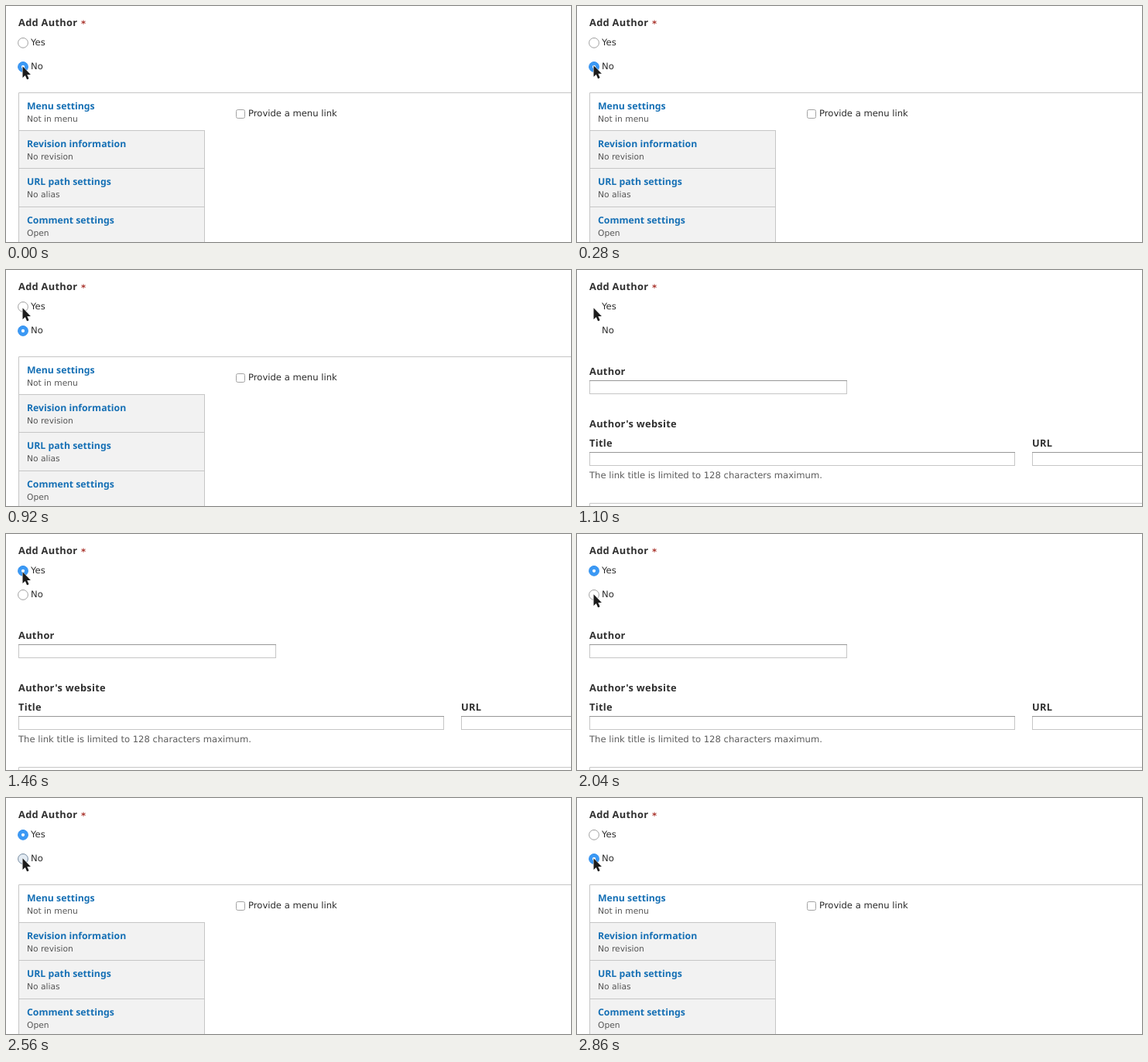
Recreate the animation shown at these times as an HTML page. Size 730x306 px, loop 2.88 s.

```html
<!DOCTYPE html>
<html lang="en">
<head>
<meta charset="utf-8">
<title>Add Author form</title>
<style>
  html, body { margin: 0; width: 100%; height: 100%; overflow: hidden; background: #fff; }
  svg { display: block; width: 730px; height: 306px; }
  text { font: 11.6px "DejaVu Sans", sans-serif; fill: #2b2b2b; text-rendering: geometricPrecision; }
  .label, .tab { font-family: "Noto Sans", sans-serif; font-weight: 700; }
  .label { font-size: 12.8px; letter-spacing: .3px; fill: #303030; }
  .tab { font-size: 12.25px; fill: #1670b5; }
  .note { font-size: 10.7px; fill: #555; }
  .hint { fill: #5c5c5c; }
  .star { font-weight: 700; fill: #a8322a; }
  .line { fill: none; stroke: #c6c6c6; }
  .top { stroke: #979797; }
  .ring { fill: #fff; stroke: #a0a0a0; }
  .dot { fill: none; }
  .on .ring { fill: #3b99f5; stroke: #3290ee; }
  .on .dot { fill: #fff; }
  .down .ring { fill: #e3ebf3; stroke: #74899e; }
</style>
</head>
<body>
<svg viewBox="0 0 730 306">
  <text class="label" x="16" y="26">Add Author</text>
  <text class="star" x="97" y="27">*</text>
  <g id="yes"><circle class="ring" cx="22" cy="47.8" r="6.4"/><circle class="dot" cx="22" cy="47.8" r="2.1"/></g>
  <g id="no"><circle class="ring" cx="22" cy="78.9" r="6.4"/><circle class="dot" cx="22" cy="78.9" r="2.1"/></g>
  <text x="32" y="51">Yes</text>
  <text x="32" y="82">No</text>

  <g id="menu">
    <path class="line" d="M730 112.5H16.5V306"/>
    <g id="tabs"></g>
    <rect x="297.5" y="134.5" width="11" height="11" rx="2" fill="#fff" stroke="#a3a3a3"/>
    <text x="313" y="143">Provide a menu link</text>
  </g>

  <g id="fields">
    <text class="label" x="16" y="136">Author</text>
    <text class="label" x="16" y="204">Author's website</text>
    <text class="label" x="16" y="229">Title</text>
    <text class="label" x="588" y="229">URL</text>
    <text class="hint" x="16" y="270">The link title is limited to 128 characters maximum.</text>
    <path class="line" d="M730 302.5H16.5V306"/>
  </g>

  <path id="cursor" d="M0 0V14.6L3.3 11.6L5.6 17L8.1 15.9L5.8 10.6H10.4Z" fill="#1c1c1c" stroke="#fff" stroke-width="1" stroke-linejoin="round" paint-order="stroke"/>
</svg>
<script>
const LOOP = 2880;
const $ = id => document.getElementById(id);
const add = (id, markup) => $(id).insertAdjacentHTML('beforeend', markup);

const tabs = [
  ['Menu settings', 'Not in menu', 112],
  ['Revision information', 'No revision', 161],
  ['URL path settings', 'No alias', 210],
  ['Comment settings', 'Open', 260]
];
tabs.forEach(([title, note, y], i) => {
  if (i) add('tabs', `<rect x="16.5" y="${y + .5}" width="240" height="52" fill="#f2f2f2" stroke="#c6c6c6"/>`);
  add('tabs', `<text class="tab" x="27" y="${y + 22}">${title}</text>
    <text class="note" x="27" y="${y + 38}">${note}</text>`);
});

for (const [x, y, w] of [[16, 143, 333], [16, 236, 550], [588, 236, 160]]) {
  add('fields', `<rect class="line" x="${x + .5}" y="${y + .5}" width="${w - 1}" height="17"/>
    <path class="line top" d="M${x} ${y + .5}h${w}"/>`);
}

const within = (t, a, b) => t >= a && t < b;
const show = (el, on) => el.setAttribute('visibility', on ? 'visible' : 'hidden');
const ease = (t, a, b) => {
  const p = Math.min(1, Math.max(0, (t - a) / (b - a)));
  return p * p * (3 - 2 * p);
};

function setRadio(el, visible, on, down) {
  show(el, visible);
  el.setAttribute('class', on ? 'on' : down ? 'down' : '');
}

function draw(now) {
  const t = now % LOOP;
  const fields = within(t, 1100, 2560);
  const radios = !within(t, 1100, 1140);
  const yes = within(t, 1140, 2640);
  show($('menu'), !fields);
  show($('fields'), fields);
  setRadio($('yes'), radios, yes, within(t, 980, 1100));
  setRadio($('no'), radios, !yes, within(t, 2440, 2640));

  const y = 78.3 - 29 * (ease(t, 240, 580) - ease(t, 1600, 1960));
  $('cursor').setAttribute('transform', `translate(21.5 ${y.toFixed(2)})`);
}

const start = performance.now();
function tick() {
  draw(performance.now() - start);
  requestAnimationFrame(tick);
}
tick();
</script>
</body>
</html>
```
